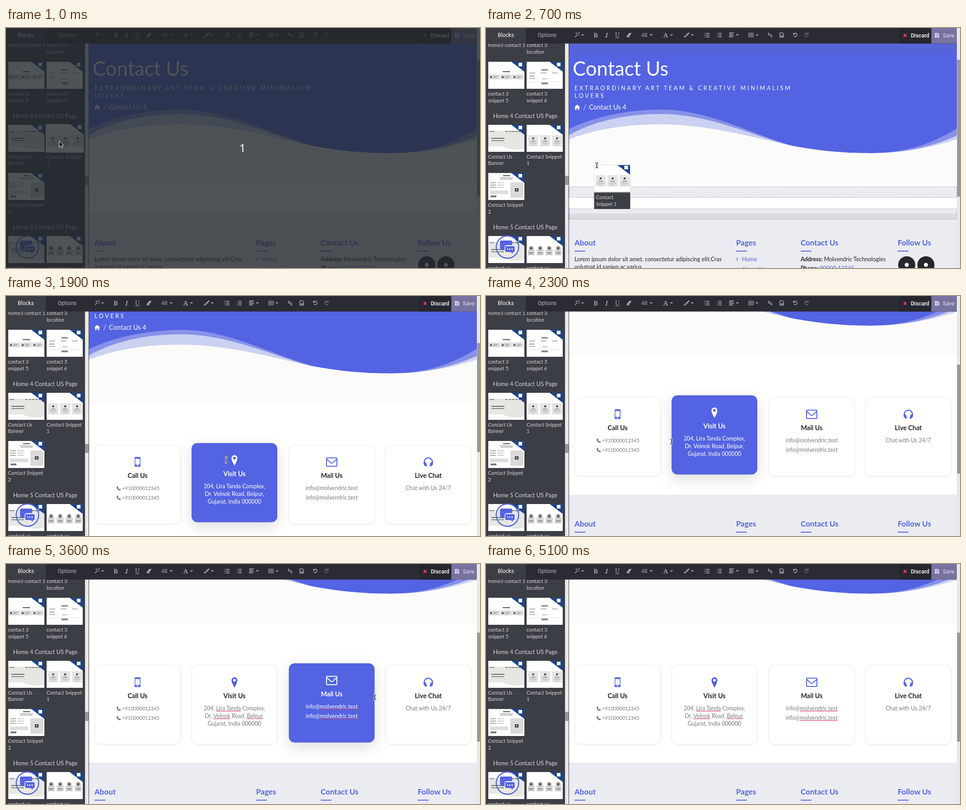
An HTML page for the animation above (5.6 s loop, 1050 by 533 pixels).

```html
<!DOCTYPE html>
<html lang="en">
<head>
<meta charset="utf-8">
<title>Page builder</title>
<style>
html, body { margin: 0; width: 100%; height: 100%; overflow: hidden; background: #2b2b33; }
svg { display: block; width: 1050px; height: 533px; }
text { font-family: Lato, "Open Sans", sans-serif; font-size: 12.6px; white-space: pre; }
.ui text { font-family: Roboto, sans-serif; font-size: 12px; }
.ui .serif { font-family: "Noto Serif", serif; font-weight: 700; font-size: 14px; }
.side text { font-size: 11.1px; fill: #d6d7d9; }
.side .group { font-size: 12.8px; }
.line { fill: none; stroke: currentColor; stroke-width: 1.6; }
.head { font-size: 17px; font-weight: 700; fill: #5363e2; }
.card text { fill: currentColor; font-size: 12.4px; text-anchor: middle; }
.card .title { font-size: 14.4px; font-weight: 700; fill: #212529; }
.card .phone { font-size: 11px; text-anchor: start; }
.card { color: #777a80; }
.card .icon { color: #5363e2; }
.card.on { color: #fff; }
.card.on .icon { color: #fff; }
.card.on .title { fill: #fff; }
.box { fill: #fffffe; stroke: #ececf0; filter: drop-shadow(0 1px 2px rgba(0,0,0,.07)); }
.on .box { filter: drop-shadow(0 10px 16px rgba(0,0,0,.13)); }
.blue .box { fill: #5363e2; stroke: #5363e2; }
.spell .typo { text-decoration: underline; fill: #d0446c; }
</style>
</head>
<body>
<svg id="stage" viewBox="0 0 1050 533" xmlns="http://www.w3.org/2000/svg"></svg>
<script>
const BLUE = '#5363e2';
const rect = (x, y, w, h, fill, more = '') =>
  `<rect x="${x}" y="${y}" width="${w}" height="${h}" fill="${fill}" ${more}/>`;
const circle = (x, y, r, fill, more = '') => `<circle cx="${x}" cy="${y}" r="${r}" fill="${fill}" ${more}/>`;
const text = (x, y, s, more = '') => `<text x="${x}" y="${y}" ${more}>${s}</text>`;
const path = (d, more = 'fill="currentColor"') => `<path d="${d}" ${more}/>`;
const line = d => path(d, 'class="line"');
const group = (more, ...parts) => `<g ${more}>${parts.join('')}</g>`;
const at = (x, y, ...parts) => group(`transform="translate(${x} ${y})"`, ...parts);
const each = (list, fn) => list.map(fn).join('');

// Snippet thumbnails, drawn in an 80 by 60 box
const bar = (x, y, w, fill = '#777', h = 1.5) => rect(x, y, w, h, fill);
const banner = rect(0, 13, 80, 35, '#e6e7e3')
  + path('M0 48C20 44 30 48 42 52S66 56 80 52V40H0Z', 'fill="#e6e7e3"')
  + bar(3, 14, 11) + each([38, 46, 53, 60, 67], x => bar(x, 14, 5, '#555'))
  + bar(7, 29, 29, '#666', 2) + bar(7, 34, 28, '#888', 2);
const art = {
  strip: bar(32, 21, 16, '#555', 2) + each([1, 27, 53], x => rect(x, 28, 25, 11, '#dcdddd')
    + rect(x + 3, 32, 4, 4, '#555') + bar(x + 10, 32, 10, '#999') + bar(x + 10, 35, 8, '#aaa')),
  lines: bar(33, 17, 14, '#555', 2) + each([6, 31, 56], x => bar(x, 24, 13, '#999'))
    + bar(6, 31, 11) + bar(6, 36, 13, '#999') + bar(34, 37, 12, '#aaa') + bar(6, 44, 68, '#ddd', 1)
    + rect(33, 46, 14, 4, '#888'),
  banner,
  cards: each([3, 29.5, 56], x => rect(x, 23, 23, 25, '#e4e5e2') + rect(x + 9.5, 28, 4, 4, '#444')
    + bar(x + 7, 35, 9, '#888') + bar(x + 4, 38, 15, '#aaa', 1) + bar(x + 4, 41, 15, '#aaa', 1) + bar(x + 7, 44, 9, '#bbb', 1)),
  form: bar(33, 5, 15, '#555', 2) + bar(25, 10, 30, '#999') + bar(27, 13, 27, '#aaa')
    + each([21, 26, 31], y => bar(4, y, 13, '#888') + bar(20, y, 15, '#bbb'))
    + rect(4, 39, 40, 8, '#ddd') + rect(5, 50, 13, 4, '#777') + rect(49, 21, 29, 34, '#d9dad9', 'rx="2"')
    + rect(59, 34, 8, 7, '#333', 'rx="1"') + circle(63, 37.5, 1.8, '#d9dad9'),
  people: each([2, 22, 42, 62], x => rect(x, 30, 16, 13, '#d8d9d8') + circle(x + 8, 27, 5, '#aaa')
    + circle(x + 8, 27, 2.2, '#444') + bar(x + 3, 36, 10) + bar(x + 3, 39, 10, '#999'))
};
const thumb = kind => rect(0, 0, 80, 60, '#fffffd') + art[kind]
  + path('M51 0H80V22Z', 'fill="#1e4489"') + rect(67, 2, 8, 8, '#fff');
const caption = (x, y, a, b) => text(x, y, a) + text(x, y + 14.5, b);

const chatBadge = circle(47.5, 486.5, 24.8, 'none', `stroke="${BLUE}" stroke-width="2.4"`)
  + path('M34 472H55Q58 472 58 475V482H46Q41 482 41 488V491L36 495V491H34Q31 491 31 488V475Q31 472 34 472Z', `fill="${BLUE}"`)
  + path('M45 484H61Q64 484 64 487V495Q64 498 61 498H60V502L54 498H45Q42 498 42 495V487Q42 484 45 484Z', `fill="${BLUE}" stroke="#eee"`)
  + each([48, 53, 58], x => circle(x, 491, 1.5, '#fff'));

const sidebar = group('class="side"',
  rect(0, 34, 175, 499, '#3b3e44'), rect(175, 34, 9, 499, '#e8e8ea'), rect(183, 34, 1, 499, '#3b3e44'),
  rect(175, 328, 8, 21, '#96979a', 'rx="3.5"'),
  text(4.5, 42, 'home3 contact 1'), caption(90, 42, 'contact 3', 'location'),
  at(5, 75, thumb('strip')), at(90, 75, thumb('lines')),
  caption(4.5, 150, 'contact 3', 'snippet 5'), caption(90, 150, 'contact 3', 'snippet 6'),
  text(87, 200, 'Home 4 Contact US Page', 'class="group" text-anchor="middle"'),
  at(5, 215, thumb('banner')), group('id="picked"', thumb('cards')),
  caption(4.5, 289.5, 'Contact Us', 'Banner'), caption(90, 289.5, 'Contact Snippet', '1'),
  at(5, 322, thumb('form')), caption(4.5, 397, 'Contact Snippet', '2'),
  text(87, 447, 'Home 5 Contact US Page', 'class="group" text-anchor="middle"'),
  at(5, 462, thumb('banner')), at(90, 462, thumb('people')),
  text(4.5, 537, 'contact us'), text(90, 537, 'contact us'), chatBadge);

const rows = (x, w, ...ys) => each(ys, y => rect(x, y, w, 1.8, 'currentColor'));
const toolbar = group('class="ui" fill="#a0a1a9" color="#a0a1a9"',
  rect(0, 0, 1043, 34.5, '#2b2b33'), rect(0, 0, 88, 34.5, '#3b3e44'),
  text(44, 20, 'Blocks', 'text-anchor="middle" fill="#fff"'),
  text(135.5, 20, 'Options', 'text-anchor="middle" fill="#b8b8be"'),
  line('M197 20L204 13M200 10V13M198.5 11.5H201.5M206 9V12M204.5 10.5H207.5M206 15V17'),
  text(243, 21, 'B', 'class="serif" text-anchor="middle"'),
  text(267, 21, 'I', 'class="serif" font-style="italic" text-anchor="middle"'),
  text(291, 20, 'U', 'class="serif" style="font-weight:400" text-anchor="middle"'), rect(286, 21.5, 10, 1, 'currentColor'),
  path('M311 19L317 11H323L317 19Z'), line('M312 20H318'),
  text(344, 20, '48'), text(398, 21, 'A', 'class="serif" text-anchor="middle"'),
  path('M449 9.5L451 11L445 18L442 16ZM441 16.5L444 18.5Q442 22 437 20Q440 19 441 16.5Z'),
  rows(488, 7, 11, 15, 19), rows(484.5, 2, 11, 15, 19), rows(515, 7, 11, 15, 19), rows(512, 1.2, 10.5, 14.5, 18.5),
  rows(538.5, 11, 10, 16), rows(538.5, 8, 13, 19),
  path('M582 11H592V20H582ZM582 14H592M582 17H592M587 12V20', 'class="line" style="stroke-width:1.2"'),
  line('M628 13L626 11.5Q624 13 625.5 14.5L628 16.5L630 15M630 19L632 20Q634 18 633 17L630.5 14.5L628.5 16.5'),
  line('M651 10.5H657L659 13V20.5H651Z'), path('M652 19L654.5 15.5L656 17L657 16L658.5 19Z'),
  line('M682 13Q688 9 689 15Q689 20 682 19'), path('M680.5 10V15H685.5Z'),
  group('opacity=".6"', line('M713 13Q707 9 706 15Q706 20 713 19'), path('M714.5 10V15H709.5Z')),
  each([214, 366, 411, 457, 557, 600], x => path(`M${x - 3.5} 14H${x + 3.5}L${x} 17.5Z`)),
  rect(915, 0, 72, 34.5, '#26262e'), path('M925.5 13.5L931 19.5M931 13.5L925.5 19.5', 'stroke="#cf3e60" stroke-width="2.6"'),
  text(941, 20.5, 'Discard', 'fill="#fff" font-weight="500"'),
  rect(986.5, 0, 56.5, 34.5, '#7773a0'),
  group('color="#dddbea"', line('M995 12H1001L1003 14V20.5H995ZM997 12V15H1001V12M997 20V17.5H1001V20')),
  text(1012, 20.5, 'Save', 'fill="#dddbea"'));

// Page, in its unscrolled position
const trough = 'C740 273 790 278 850 278';
const wave = (curve, fill) => path(`M184 ${curve}V345H184Z`, `fill="${fill}"`);
const hero = rect(184, -200, 859, 540, BLUE)
  + wave(`224C250 192 330 181 390 181C490 181 590 236 680 262${trough}C940 278 1000 250 1043 223`, '#8791e9')
  + wave(`238C245 203 320 191 385 191C500 191 590 240 680 262${trough}C940 278 1000 258 1043 239`, '#cbd1f1')
  + wave(`247C250 222 320 214 385 214C500 214 600 246 680 262${trough}C930 278 990 264 1043 247`, '#fbfcfa')
  + group('fill="#fff" color="#fff"',
    text(192, 106, 'Contact Us', 'style="font-size:43.6px"'),
    group('style="letter-spacing:3.65px"',
      text(196, 137.5, 'EXTRAORDINARY ART TEAM &amp; CREATIVE MINIMALISM'), text(196, 154.5, 'LOVERS')),
    path('M195.5 176L202 170L208.5 176H206.5V182H203.5V178H200.5V182H197.5V176Z'),
    text(215, 182, '/', 'style="font-size:17px" opacity=".7"'),
    text(228, 181, 'Contact Us 4', 'style="font-size:14.5px"'));

const icons = {
  mobile: path('M-4.5 -11H4.5Q6.5 -11 6.5 -9V9Q6.5 11 4.5 11H-4.5Q-6.5 11 -6.5 9V-9Q-6.5 -11 -4.5 -11ZM-5 -7V6H5V-7ZM-1.5 8.5A1.5 1.5 0 1 0 1.5 8.5A1.5 1.5 0 1 0 -1.5 8.5Z', 'fill="currentColor" fill-rule="evenodd"'),
  pin: path('M0 12Q-6.5 1 -6.5 -4.5A6.5 6.5 0 0 1 6.5 -4.5Q6.5 1 0 12ZM-3 -4.5A3 3 0 1 0 3 -4.5A3 3 0 1 0 -3 -4.5Z', 'fill="currentColor" fill-rule="evenodd"'),
  mail: path('M-10 -9H10Q11.5 -9 11.5 -7.5V8Q11.5 9.5 10 9.5H-10Q-11.5 9.5 -11.5 8V-7.5Q-11.5 -9 -10 -9ZM-11 -6L-2 2Q0 3.5 2 2L11 -6', 'class="line" style="stroke-width:2"'),
  phones: path('M-9 5V0A9 9 0 0 1 9 0V5', 'class="line" style="stroke-width:2.4"')
    + path('M-10.5 1Q-6 -1 -5 2L-3 8Q-3 10 -5 10Q-9 9 -10.5 4ZM10.5 1Q6 -1 5 2L3 8Q3 10 5 10Q9 9 10.5 4Z')
};
const typo = s => `<tspan class="typo"><tspan fill="currentColor">${s}</tspan></tspan>`;
const handset = (x, y) => at(x, y, path('M-4 -4L-2 -5L-.5 -2L-1.5 -1Q0 1.5 1.5 2L2.5 1L5 2.5Q4.5 5 2 5Q-4.5 2.5 -4.5 -2Z'));
const cards = [
  { x: 197, icon: 'mobile', title: 'Call Us', body: c => each([325, 346], y => handset(c - 42, y - 4) + text(c - 34.5, y, '+910000012345', 'class="phone"')) },
  { x: 411.5, icon: 'pin', title: 'Visit Us', body: c => text(c, 325, `204, ${typo('Lira Tanda')} Complex,`)
      + text(c, 342, `Dr. ${typo('Velnok')} Road, ${typo('Belpur')},`) + text(c, 359, 'Gujarat, India 000000') },
  { x: 627, icon: 'mail', title: 'Mail Us', body: c => each([325, 346], y => text(c, y, `info@${typo('molvendric.test')}`)) },
  { x: 841, icon: 'phones', title: 'Live Chat', body: c => text(c, 325, 'Chat with Us 24/7') }
];
const CARD_W = 189;
const drawCard = ({ x, icon, title, body }) => {
  const c = x + CARD_W / 2;
  return group('class="card"', rect(x, 225, CARD_W, 175, '#fff', 'rx="12" class="box"'),
    group(`class="icon" transform="translate(${c} 262.5)"`, icons[icon]),
    text(c, 298, title, 'class="title"'), body(c));
};

const heading = (x, s) => text(x, 483, s, 'class="head"') + rect(x, 494.5, 24, 2, BLUE);
const footer = rect(184, 412, 859, 400, '#ebecf1')
  + heading(196, 'About') + heading(554, 'Pages') + heading(697, 'Contact Us') + heading(912, 'Follow Us')
  + group('fill="#212529"',
    text(196, 518, 'Lorem ipsum dolor sit amet, consectetur adipiscing elit.Cras'),
    text(196, 535, 'volutpat id sapien ac varius'),
    text(697, 518, '<tspan font-weight="700">Address:</tspan> Molvendric Technologies'),
    text(697, 538, `<tspan font-weight="700">Phone:</tspan> <tspan fill="${BLUE}">00000 12345</tspan>`))
  + group(`fill="${BLUE}" color="${BLUE}"`,
    path('M555 510.5L558 513.5L555 516.5', 'class="line" style="stroke-width:1.2"'),
    text(567, 518, 'Home'), text(567, 541, 'About Us'))
  + each([932, 974.5], x => circle(x, 526, 19, '#25272c') + circle(x, 526, 4.5, '#fff'));

const dropzone = (y, h) => rect(184.5, y, 858, h, 'rgb(120,116,160)', 'class="zone"')
  + rect(184.5, y, 858, h, 'none', 'stroke="#32325a" stroke-opacity=".35" stroke-dasharray="4 2"');

const pointers = {
  arrow: path('M0 0V13.5L3 10.7L5.3 15.5L7.5 14.5L5.2 9.8H9.5Z', 'fill="#000" stroke="#fff"'),
  hand: path('M-4.5 5L-7 1.5Q-7.5 -1 -4.5 .5L-4.5 -4Q-3 -6 -2 -4Q-1 -7 .5 -5Q2 -7 3 -4.5Q5 -6 5.5 -3L5.5 2Q5 5 3.5 7H-2.5Z', 'fill="#fff" stroke="#000" stroke-width="1.2"')
    + path('M-2 -4V0M.7 -5V0M3.2 -4V0', 'stroke="#000"'),
  beam: path('M-3 -5.5H3M-3 5.5H3M0 -5.5V5.5', 'stroke="#fff" stroke-width="3.4"')
    + path('M-3 -5.5H-.8M.8 -5.5H3M-3 5.5H-.8M.8 5.5H3M0 -5V5', 'stroke="#111" stroke-width="1.5"')
};

const stage = document.getElementById('stage');
stage.innerHTML = `<clipPath id="view">${rect(184, 34, 859, 499, '#000')}</clipPath>`
  + rect(184, 34, 859, 499, '#fffffd')
  + group('clip-path="url(#view)"',
    group('id="page"', hero, group('id="cards" transform="translate(0 212)"', each(cards, drawCard)), group('id="footer"', footer)),
    group('id="zones"', dropzone(30, 24.5), dropzone(352.5, 24), dropzone(401.5, 23)))
  + rect(1043, 0, 7, 533, '#e8e8ea') + rect(1043.5, 70, 6.5, 305, '#97989a', 'id="thumb" rx="3.2"')
  + sidebar + toolbar
  + group('id="clone" class="side"', rect(0, 60, 80, 38, '#3b3e44'), thumb('cards'),
    rect(0, 0, 80, 61, 'none', 'stroke="#ddd"'), caption(4, 76, 'Contact', 'Snippet 1'))
  + group('id="dim"', rect(0, 0, 1050, 533, 'rgb(34,40,46)', 'fill-opacity=".8"'),
    text(524, 276, '1', 'fill="#fff" text-anchor="middle" style="font:25px \'Noto Sans\',sans-serif"'))
  + group('id="pointer"', each(Object.keys(pointers), k => group(`data-kind="${k}"`, pointers[k])));

const LOOP = 5600, STEP = 100, SCROLL = 212;
// time, x, y
const track = [
  [0, 118, 251], [300, 118, 251], [500, 149, 274], [1300, 535, 398], [1600, 535, 398], [2200, 440, 330],
  [2300, 411, 323], [2400, 404, 316], [2700, 391, 304], [2800, 351, 296], [3000, 300, 300], [3100, 330, 298],
  [3600, 817, 296], [3900, 935, 300], [4200, 960, 310], [4700, 560, 290], [4900, 230, 150], [5000, 22, 18], [LOOP, 22, 18]
];
const clamp = v => Math.min(1, Math.max(0, v));
function mouseAt(t) {
  const i = Math.max(1, track.findIndex(k => k[0] >= t));
  const [t0, x0, y0] = track[i - 1], [t1, x1, y1] = track[i];
  const p = clamp((t - t0) / (t1 - t0));
  return [x0 + (x1 - x0) * p, y0 + (y1 - y0) * p];
}
const scrollAt = t => SCROLL * clamp((t - 1600) / 600);
function hoveredAt(t) {
  if (t < 1500) return -1;
  const [x, y] = mouseAt(t), top = 225 + SCROLL - scrollAt(t);
  return cards.findIndex(c => x >= c.x - 3 && x <= c.x + CARD_W + 3 && y >= top && y <= top + 175);
}
const el = id => document.getElementById(id);
const move = (node, x, y, more = '') => node.setAttribute('transform', `translate(${x} ${y}) ${more}`);
const show = (node, on) => { node.style.display = on ? '' : 'none'; };
const cardNodes = [...el('cards').children];
const zoneNodes = [...document.querySelectorAll('.zone')];
const pointerNodes = [...el('pointer').children];

function draw(t) {
  const [x, y] = mouseAt(t), dropped = t >= 1500, dragging = t >= 600 && !dropped;
  const scroll = scrollAt(t), over = hoveredAt(t), settled = over === hoveredAt(t - STEP);

  show(el('dim'), t < 100);
  show(el('zones'), dragging);
  show(el('clone'), dragging);
  show(el('cards'), dropped);
  move(el('clone'), x - 6, y - 1);
  zoneNodes.forEach(z => z.setAttribute('fill-opacity', .12 + .2 * clamp((Math.min(t, 1300) - 600) / 1000)));
  t < 600 ? move(el('picked'), 88, 213.5, 'scale(1.055)') : move(el('picked'), 90, 215);

  move(el('page'), 0, -scroll);
  move(el('footer'), 0, dropped ? 241 : 0);
  el('thumb').setAttribute('y', dropped ? 56 + 96 * scroll / SCROLL : 70);
  el('thumb').setAttribute('height', dropped ? 243 : 305);

  stage.classList.toggle('spell', t >= 2400);
  cardNodes.forEach((node, i) => {
    node.classList.toggle('on', i === over);
    node.classList.toggle('blue', i === over && settled);
    move(node, 0, i === over ? -4 : 0);
  });

  const kind = x >= 184 && y > 34 ? 'beam' : t >= 400 && t < 1500 ? 'hand' : 'arrow';
  show(el('pointer'), t < 5100);
  move(el('pointer'), x, y);
  pointerNodes.forEach(n => show(n, n.dataset.kind === kind));
}

const start = performance.now();
function tick() {
  const t = (performance.now() - start) % LOOP;
  draw(Math.floor(t / STEP) * STEP);
  requestAnimationFrame(tick);
}
tick();
</script>
</body>
</html>
```
